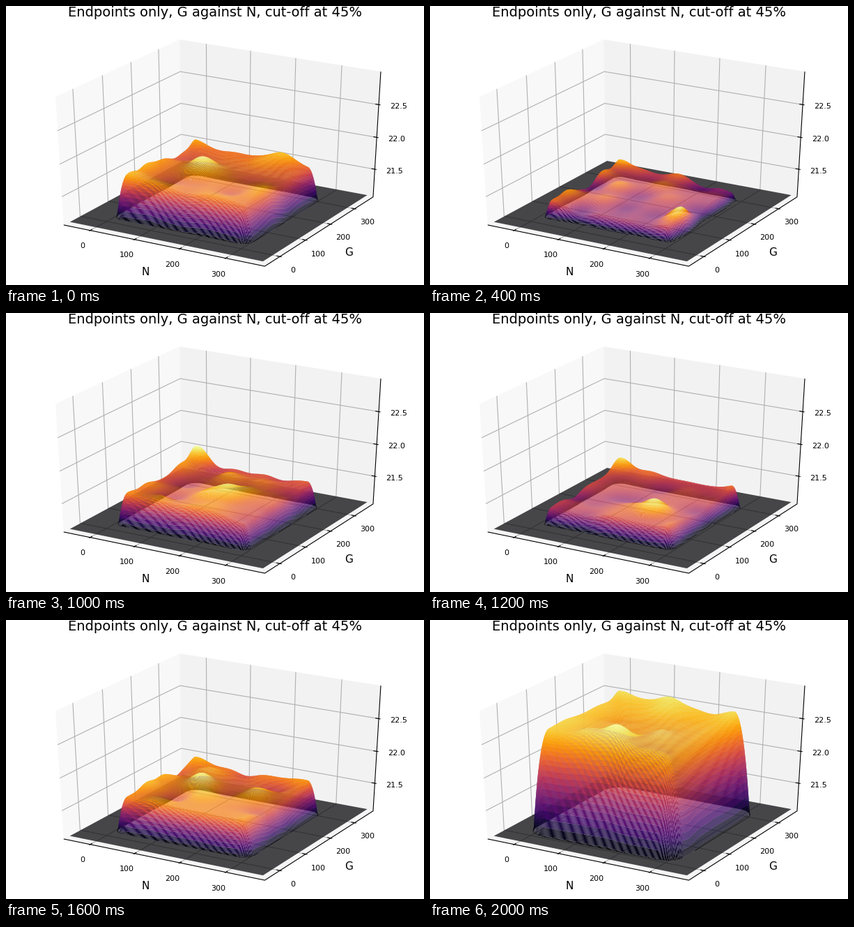
These frames come from a looping animation (600 px wide and 400 px high, 2.2 s). A matplotlib script:

```python
import numpy as np
import matplotlib.pyplot as plt
from matplotlib.animation import FuncAnimation
from matplotlib.collections import PolyCollection

W, H = 600, 400
N = 256
INTERVAL = 200
PAD = 0.02             # gap between the data and the box
STEEP = 100            # curvature of the flanks
LOW, HIGH = 0.195, 0.79  # where the flanks begin
BUMP = 0.05            # spread of one bump
TICK_PAD, NAME_PAD = 0.0637, 0.1385

plt.rcParams["font.family"] = "DejaVu Sans"
plt.rcParams["text.kerning_factor"] = 6
fig = plt.figure(figsize=(W / 100, H / 100), dpi=100, facecolor="white")
ax = fig.add_axes([0, 0, 1, 1])
ax.axis("off")


def project(x, y, z):
    """Perspective view (elev 30, azim -60) of the unit box, in pixels."""
    x, y, z = np.asarray(x) - 0.5, np.asarray(y) - 0.5, np.asarray(z) - 0.5
    depth = 0.433 * x - 0.75 * y + 0.5 * z
    scale = 1 / (1 - depth / 10)
    px = 308.3 + 333.2 * scale * (0.866 * x + 0.5 * y)
    py = 205.0 - 209.6 * scale * (-0.25 * x + 0.433 * y + 0.866 * z)
    return px, py, depth


def line(points, color, order):
    px, py, _ = project(*np.array(points, float).T)
    ax.plot(px, py, color=color, lw=0.8, zorder=order, solid_capstyle="butt")


def pane(points, shade):
    px, py, _ = project(*np.array(points, float).T)
    ax.fill(px, py, fc=(shade, shade, shade, 0.5), lw=0, zorder=0)


def label(point, text, size=8, va="top"):
    px, py, _ = project(*point)
    ax.text(px, py, text, size=size, ha="center", va=va, zorder=6)


def draw_box():
    pane([(0, 0, 0), (0, 1, 0), (0, 1, 1), (0, 0, 1)], 0.95)
    pane([(0, 1, 0), (1, 1, 0), (1, 1, 1), (0, 1, 1)], 0.90)
    pane([(0, 0, 0), (1, 0, 0), (1, 1, 0), (0, 1, 0)], 0.925)

    grey, out, inn, gap = "#b0b0b0", 0.1 / 12, 0.2 / 12, TICK_PAD
    for v in (0, 100, 200, 300):
        x, y = (v + 60.9) / 444, (v + 57) / 436
        line([(x, 0, 0), (x, 1, 0), (x, 1, 1)], grey, 1)
        line([(1, y, 0), (0, y, 0), (0, y, 1)], grey, 1)
        line([(x, -out, 0), (x, inn, 0)], "black", 5)
        line([(1 + out, y, 0), (1 - inn, y, 0)], "black", 5)
        label((x, -gap, -gap), str(v))
        label((1 + gap, y, -gap), str(v))
    for v in (21.5, 22.0, 22.5):
        z = (v - 21.055) / 1.9376
        line([(0, 0, z), (0, 1, z), (1, 1, z)], grey, 1)
        line([(1 + out, 1, z), (1 - inn, 1, z)], "black", 5)
        label((1 + gap, 1 + gap, z), str(v))
    line([(0, 0, 0), (1, 0, 0), (1, 1, 0), (1, 1, 1)], "black", 5)

    label((0.5, -NAME_PAD, -NAME_PAD), "N", 11, "center")
    label((1 + NAME_PAD, 0.5, -NAME_PAD), "G", 11, "center")
    ax.text(300, 15, "Endpoints only, G against N, cut-off at 45%",
            size=14, ha="center", va="baseline", zorder=6)


# One random landscape per step: plateau height, then its highest peak (u, v).
STEPS = [(0.30, 0.42, 0.46), (0.27, 0.50, 0.40), (0.10, 0.80, 0.30),
         (0.24, 0.45, 0.60), (0.21, 0.50, 0.53), (0.22, 0.60, 0.40),
         (0.15, 0.65, 0.33), (0.32, 0.50, 0.35), (0.27, 0.40, 0.50),
         (0.29, 0.53, 0.45), (0.80, 0.52, 0.23)]

grid = np.linspace(0, 1, N)
U, V = np.meshgrid(grid, grid)
BX, BY = PAD + (1 - 2 * PAD) * U, PAD + (1 - 2 * PAD) * V
FLOOR_X, FLOOR_Y, _ = project(BX, BY, np.full_like(BX, PAD))
INFERNO = plt.get_cmap("inferno")
drawn = []


def flank(t):
    return STEEP * np.maximum(0, np.maximum(LOW - t, t - HIGH)) ** 2


def bump(u, v):
    return np.exp(-((U - u) ** 2 + (V - v) ** 2) / (2 * BUMP ** 2))


def heights(step):
    level, u, v = STEPS[step]
    h = level - flank(U) - flank(V)
    h += 0.10 * bump(u, v) + 0.07 * bump(0.2, 0.8)
    rng = np.random.default_rng(40 + step)
    for cu in np.linspace(0.2, 0.8, 5):
        for cv in np.linspace(0.2, 0.8, 5):
            du, dv = rng.uniform(-0.04, 0.04, 2)
            h += rng.uniform(-0.05, 0.06) * bump(cu + du, cv + dv)
    return h


def corners(a):
    return np.stack([a[:-1, :-1], a[:-1, 1:], a[1:, 1:], a[1:, :-1]], axis=-1)


def update(step):
    while drawn:
        drawn.pop().remove()
    raw = heights(step)
    h = np.maximum(raw, 0)
    px, py, depth = project(BX, BY, PAD + h)

    # Flat part: tiny cells blend to about 72 % cover.
    drawn.append(ax.contourf(FLOOR_X, FLOOR_Y, raw, levels=[-50, 0],
                             colors=[INFERNO(0.0)], alpha=0.715,
                             antialiased=True, zorder=2))

    cell_h = corners(h)
    keep = cell_h.max(axis=-1) > 0
    order = np.argsort(corners(depth)[keep].mean(axis=-1))
    quads = np.stack([corners(px)[keep], corners(py)[keep]], axis=-1)[order]
    shade = cell_h[keep].mean(axis=-1)[order] / h.max()
    hill = PolyCollection(quads, facecolors=INFERNO(shade), edgecolors="none",
                          linewidths=0, antialiaseds=True, zorder=3)
    ax.add_collection(hill, autolim=False)
    drawn.append(hill)
    return drawn


draw_box()
ax.set(xlim=(0, W), ylim=(H, 0))
anim = FuncAnimation(fig, update, frames=len(STEPS), interval=INTERVAL,
                     repeat=True, repeat_delay=0, blit=False)
plt.show()
```
